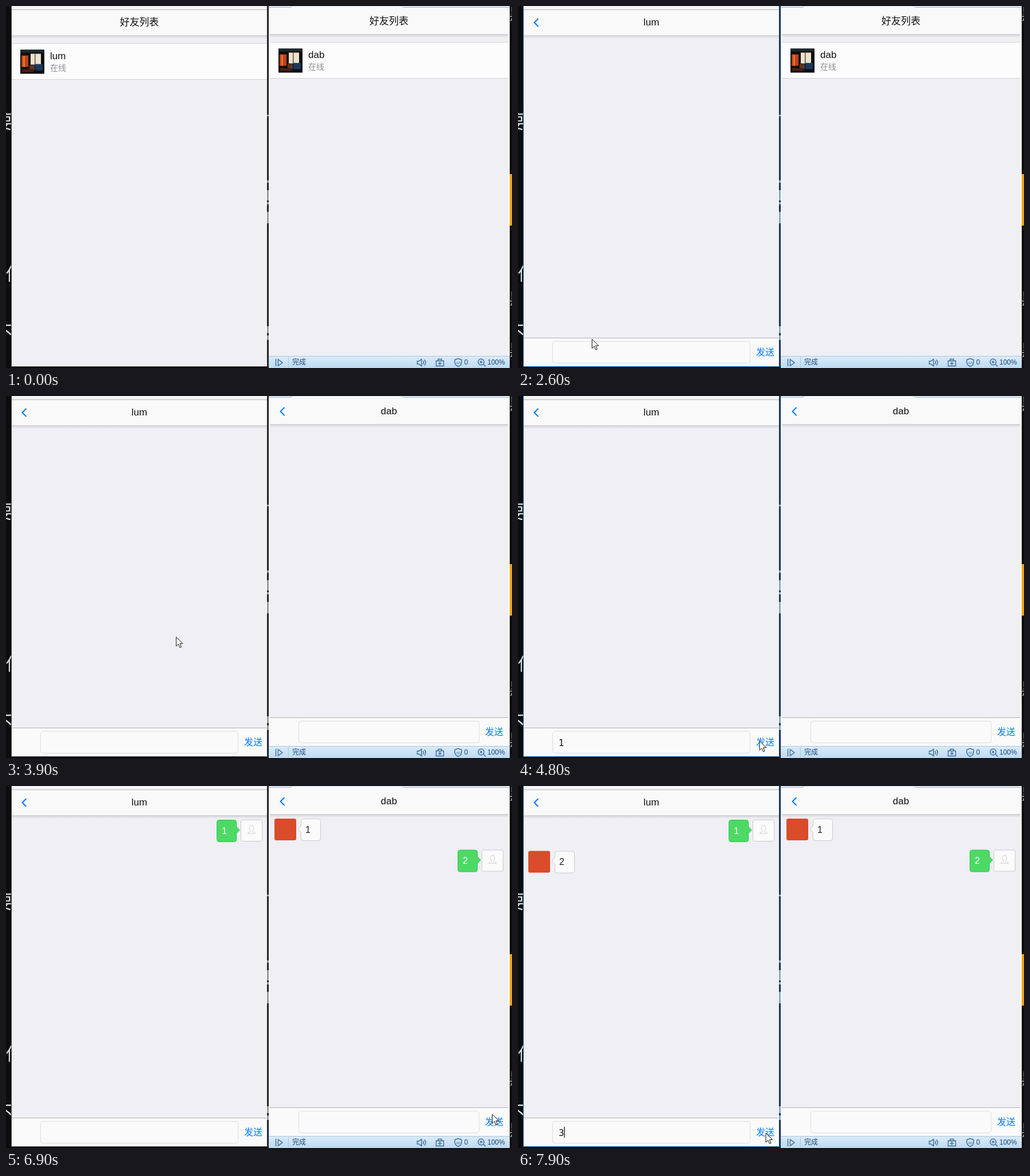
An HTML page that plays this animation: 884x633 px, repeating every 8 s.

```html
<!DOCTYPE html>
<html lang="zh-CN">
<head>
<meta charset="utf-8">
<style>
html, body { margin: 0; width: 100%; height: 100%; overflow: hidden; background: #0d0b0c; }
svg { display: block; }
text { font-family: "Liberation Sans", "Noto Sans CJK SC", "Noto Sans CJK", sans-serif; }
.typed { font: 15px "DejaVu Sans", sans-serif; }
.send { font-size: 16px; fill: #007aff; }
.icon { fill: none; stroke: #3d6a98; stroke-width: 1.4; }
.status { font-size: 12px; fill: #1f4a78; }
</style>
</head>
<body>
<svg id="stage" width="884" height="633" viewBox="0 0 884 633"></svg>
<script>
const LOOP = 8000, STEP = 100;
const rect = (x, y, w, h, fill, more = '') =>
  `<rect x="${x}" y="${y}" width="${w}" height="${h}" fill="${fill}" ${more}/>`;
const text = (x, y, size, fill, str, more = '') =>
  `<text x="${x}" y="${y}" font-size="${size}" fill="${fill}" ${more}>${str}</text>`;
const path = (d, more = '') => `<path d="${d}" ${more}/>`;
const group = (id, body) => `<g id="${id}">${body}</g>`;

// Room photo reduced to flat tones
const photo = (x, y) => `<g transform="translate(${x} ${y})">` +
  rect(0, 0, 42, 42, '#100d10') + rect(0, 0, 42, 5, '#1d2a2c') +
  rect(2, 10, 12, 20, '#b8431a') + rect(5, 11, 3, 19, '#e8752c') +
  rect(18, 7, 18, 19, '#e9e3d2') + rect(25, 7, 1.5, 19, '#6d4a35') +
  rect(16, 27, 9, 9, '#5c3428') + rect(26, 25, 13, 11, '#1b3a5e') +
  rect(3, 34, 20, 5, '#4a1d12') + '</g>';

function sent(w, y, str) {
  const x = w - 88;
  return rect(x + .5, y + .5, 34, 38, '#4cd964', 'stroke="#2ac845" rx="4"') +
    path(`M${x + 34} ${y + 12}l6 6l-6 6z`, 'fill="#4cd964"') +
    path(`M${x + 34.5} ${y + 12}l6 6l-6 6`, 'fill="none" stroke="#2ac845"') +
    text(x + 9, y + 24.5, 16, '#fff', str) +
    rect(w - 45.5, y + .5, 37, 37, '#fbfbfb', 'stroke="#ccc" rx="2"') +
    path(`M${w - 33.5} ${y + 24}c1-4 6-2 4.500-5c-3-4-2-9 2-9s5 5 2 9c-1.500 3 3.500 1 4.500 5z`,
      'fill="none" stroke="#ddd" stroke-width="1.300"');
}

function received(y, str) {
  return rect(8, y, 38, 38, '#da4b2a', 'rx="3"') +
    rect(54.5, y + .5, 34, 38, '#fbfbfb', 'stroke="#ccc" rx="4"') +
    path(`M55.500 ${y + 12}l-6 6l6 6z`, 'fill="#fbfbfb"') +
    path(`M54.500 ${y + 12}l-5 6l5 6`, 'fill="none" stroke="#ccc"') +
    text(62, y + 24.5, 16, '#222', str);
}

function pane(id, x, y, w, h, friend, messages) {
  const foot = h - 50, mid = w / 2;
  const title = str => text(mid, 27, 17, '#111', str, 'text-anchor="middle"');
  const list = rect(0, 58.5, w, 63, '#fcfcfc') +
    path(`M0 58.500H${w}M0 121.500H${w}`, 'stroke="#d4d3d8"') +
    photo(15, 69.5) + text(67, 85.5, 17, '#111', friend) +
    text(67, 105.500, 14, '#8f8f94', '在线') + title('好友列表');
  const chat = title(friend) +
    path('M25.500 15L18.500 22L25.500 29', 'fill="none" stroke="#007aff" stroke-width="2"') +
    rect(0, foot, w, 50, '#fafafb') + path(`M0 ${foot + .5}H${w}`, 'stroke="#b2b2b6"') +
    rect(50.5, foot + 6.5, w - 101, 38, '#fafafb', 'stroke="#ddd" rx="4"') +
    `<text id="${id}Typed" class="typed" x="61" y="${foot + 32}" fill="#111"></text>` +
    rect(61, foot + 16, 1.3, 19, '#111', `id="${id}Caret"`) +
    `<text class="send" x="${w - 40}" y="${foot + 31}">发送</text>` + messages;
  return `<g transform="translate(${x} ${y})">` + rect(0, 0, w, h, '#efeff4') +
    rect(0, 44, w, 6, 'url(#shade)') + rect(0, 0, w, 44, '#f9f9f9') +
    group(id + 'List', list) + group(id + 'Chat', chat) + '</g>';
}

const gradient = (id, a, b) => `<linearGradient id="${id}" x2="0" y2="1">
  <stop stop-color="${a}"/><stop offset="1" stop-color="${b}"/></linearGradient>`;

const backdrop = rect(0, 0, 884, 633, '#0d0b0c') +
  text(-21, 214, 32, '#ddd', '要') + text(0, 479, 30, '#ddd', '你') + text(-21, 582, 32, '#ddd', '不') +
  text(879, 24, 28, '#999', '黑') + text(879, 522, 28, '#999', '黑') + text(879, 612, 28, '#999', '黑') +
  rect(880, 294, 4, 90, '#f5a20c') +
  [[190, 3], [305, 4], [322, 18], [343, 4], [360, 20], [560, 12], [576, 8]]
    .map(([y, h]) => rect(456, y, 3, h, '#ccc')).join('');

const statusBar = rect(459, 612, 421, 21, 'url(#bar)') + path('M459 612.500H880', 'stroke="#a9c6e2"') +
  path('M493.500 614V632', 'stroke="#a8c8e4"') +
  '<g class="icon">' +
  path('M471.500 617V630M475.500 618L483 623.500L475.500 629Z') +
  path('M718.500 621H721.500L726 617.500V629.500L721.500 626H718.500ZM728.500 620.500q2.500 3 0 6M731 618.500q4.500 5 0 10') +
  path('M751.500 620.500H764.500V629.500H751.500ZM755 620V617.500H761V620M758 622V628M755 625H761') +
  path('M790 616.500L796 618.500V623Q795.500 628 790 630.500Q784.500 628 784 623V618.500Z') +
  '<circle cx="830" cy="622.500" r="5.200"/>' + path('M834 626.500L838 630.500M827.500 622.500H832.500M830 620V625') +
  '</g>' + text(786.5, 625.5, 5.5, '#3d6a98', 'AD') +
  '<text class="status" x="500" y="627">完成</text>' +
  '<text class="status" x="800.500" y="627">0</text>' +
  '<text class="status" x="841" y="627">100%</text>';

const stage = document.getElementById('stage');
stage.innerHTML = '<defs>' + gradient('shade', '#cfcfd2', '#efeff4') + gradient('bar', '#dcecfa', '#bcd9f0') + '</defs>' +
  backdrop +
  rect(10, 0, 446, 7, '#f4f4f4') + path('M10 6.500H456', 'stroke="#b4b4b4"') +
  pane('left', 10, 7, 446, 623, 'lum',
    group('leftSent', sent(446, 52, 1)) + group('leftGot', received(106.5, 2))) +
  `<rect id="frame" x="9.500" y="-4" width="448" height="634.500" fill="none"/>` +
  rect(459, 0, 421, 633, '#f9f9f9') + rect(459, 0, 421, 2.5, '#d9e6f5') +
  path('M459 2.500H497L501 0H691L695 2.500H880', 'fill="#fbfdff" stroke="#a9bdd6"') +
  pane('right', 461, 5, 416, 607, 'dab',
    group('rightGot', received(52, 1)) + group('rightSent', sent(416, 106.5, 2))) +
  statusBar +
  group('arrow', path('M0 0V16L3.800 12.500L6.500 18.500L9 17.400L6.400 11.500H11.500Z', 'fill="#fff" stroke="#111"')) +
  group('beam', path('M-3.500 -7.500H-1L0 -6.500L1 -7.500H3.500M0 -6.500V6.500M-3.500 7.500H-1L0 6.500L1 7.500H3.500',
    'fill="none" stroke="#111" stroke-width="1.200"'));

// Pointer stops: time, x, y
const stops = [
  [100, 829, 600], [700, 216, 92.5], [1400, 216, 92.5], [2100, 106, 605], [2500, 106, 605],
  [3300, 649.5, 83.5], [3600, 649.5, 83.5], [4100, 106, 605], [4300, 106, 605],
  [4400, 217, 598], [4500, 273, 598], [4600, 340, 598], [4700, 380, 598], [4800, 422, 603.5],
  [5200, 422, 603.5], [5700, 598, 594], [6200, 598, 594], [6300, 625, 589], [6400, 711, 588],
  [6600, 849.5, 574], [6900, 849.5, 574], [7400, 353, 605], [7700, 353, 605], [7900, 433, 607], [LOOP, 433, 607]];

function pointer(t) {
  const i = stops.findIndex(s => s[0] > t);
  if (i < 1) return null;
  const [t0, x0, y0] = stops[i - 1], [t1, x1, y1] = stops[i];
  const p = (t - t0) / (t1 - t0), e = p * p * (3 - 2 * p);
  return [x0 + (x1 - x0) * e, y0 + (y1 - y0) * e];
}

const el = id => document.getElementById(id);
const show = (id, on) => el(id).style.display = on ? '' : 'none';
const within = (t, ...spans) => spans.some(([a, b]) => t >= a && t < b);
const inBox = ([x, y], x0, y0, x1, y1) => x > x0 && x < x1 && y > y0 && y < y1;

function draw(t) {
  const leftOpen = t >= 1100, rightOpen = t >= 3500;
  show('leftList', !leftOpen);
  show('leftChat', leftOpen);
  show('rightList', !rightOpen);
  show('rightChat', rightOpen);
  show('leftSent', t >= 5100);
  show('rightGot', t >= 5100);
  show('rightSent', t >= 6800);
  show('leftGot', t >= 7000);

  const leftTyped = within(t, [4300, 5100]) ? '1' : t >= 7700 ? '3' : '';
  const rightTyped = within(t, [6100, 6800]) ? '2' : '';
  el('leftTyped').textContent = leftTyped;
  el('rightTyped').textContent = rightTyped;
  el('leftCaret').setAttribute('x', leftTyped ? 70.5 : 61);
  el('rightCaret').setAttribute('x', rightTyped ? 70.5 : 61);
  show('leftCaret', within(t, [2100, 2600], [4200, 4700], [7500, LOOP]));
  show('rightCaret', within(t, [5700, 6500]));

  const focused = within(t, [700, 3200], [4200, 5500], [7400, LOOP]);
  el('frame').setAttribute('stroke', focused ? '#1179c9' : '#4a4a4c');

  const pos = pointer(t);
  const typing = pos && (leftOpen && inBox(pos, 60, 587, 406, 625) ||
    rightOpen && inBox(pos, 511, 569, 827, 607));
  show('arrow', pos && !typing);
  show('beam', typing);
  if (pos) el(typing ? 'beam' : 'arrow').setAttribute('transform', `translate(${pos})`);
}

const start = performance.now();
function tick() {
  const t = (performance.now() - start) % LOOP;
  draw(Math.floor(t / STEP) * STEP);
  requestAnimationFrame(tick);
}
tick();
</script>
</body>
</html>
```
